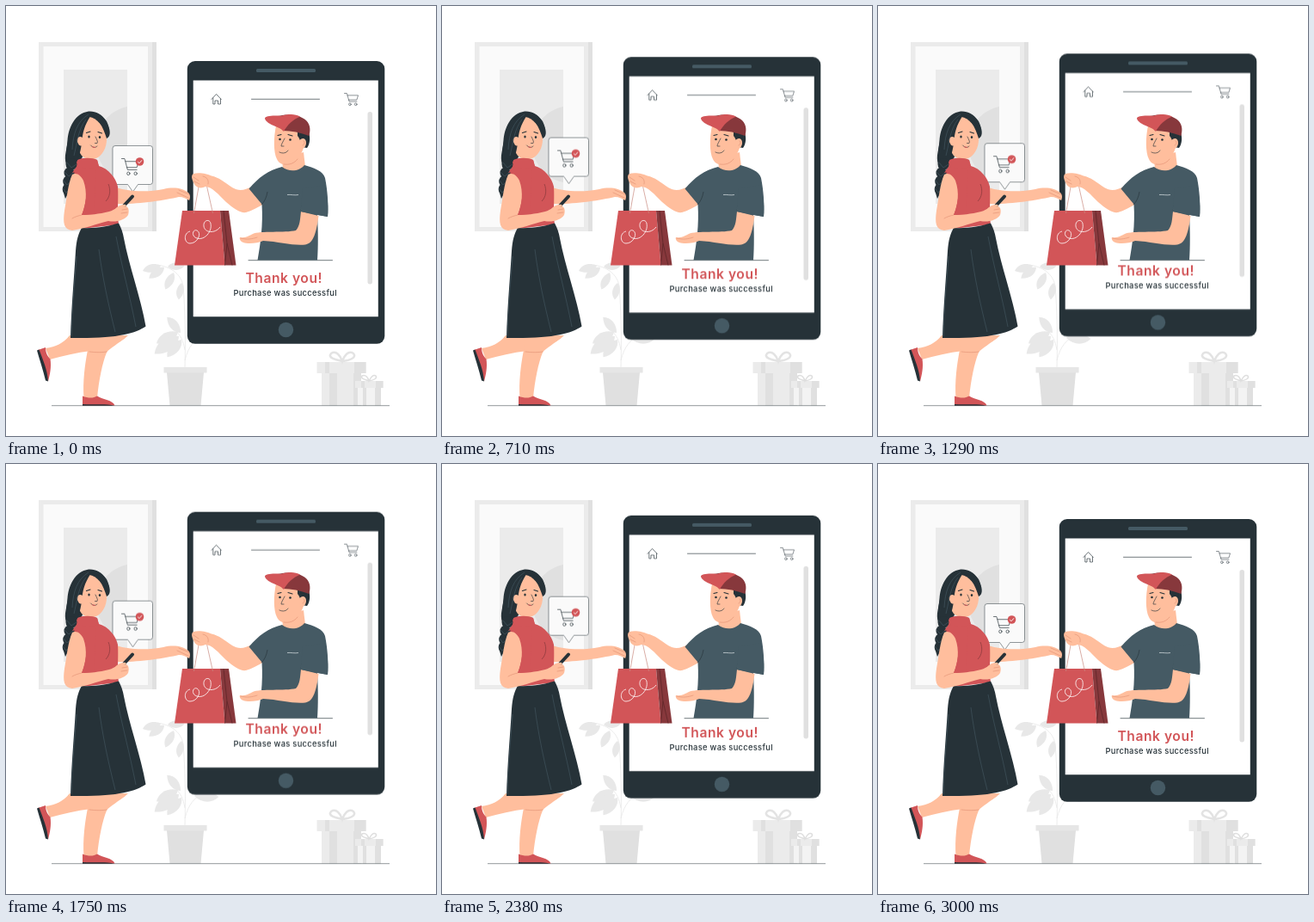
An HTML page that plays this animation: 500 by 500 pixels, repeating every 3.04 s.

```html
<!DOCTYPE html>
<html lang="en">
<head>
<meta charset="utf-8">
<title>Purchase successful</title>
<style>
html, body { margin: 0; width: 100%; height: 100%; overflow: hidden; background: #fff; }
svg { display: block; width: 100vw; height: 100vh; }

/* 24 pictures a second: 3 s of movement, then one picture of rest */
.tablet, .bubble { animation: 3040ms -5ms infinite; }
.tablet { animation-name: drift; animation-timing-function: steps(36, end); }
.bubble { animation-name: bob; animation-timing-function: steps(18, end); }
@keyframes drift {
  0%, 98.684%, 100% { transform: translateY(0); }
  49.342% { transform: translateY(-10px); }
}
@keyframes bob {
  0%, 49.342%, 98.684%, 100% { transform: translateY(0); }
  24.671%, 74.013% { transform: translateY(-10px); }
}

.skin { fill: #ffbe9d; }
.red { fill: #d25558; }
.maroon { fill: #87383c; }
.dark { fill: #263238; }
.slate { fill: #455a64; }
.g1 { fill: #e0e0e0; }
.g2 { fill: #ebebeb; }
.g3 { fill: #f3f3f3; }
.line { fill: none; stroke: #263238; stroke-width: .65; stroke-linecap: round; stroke-linejoin: round; }
.brow { fill: none; stroke: #263238; stroke-width: 1.1; stroke-linecap: round; }
.crease { fill: none; stroke: #e08f72; stroke-width: .6; stroke-linecap: round; }
.fold { fill: none; stroke: #455a64; stroke-width: .6; }
text { font-family: Inter, "Open Sans", sans-serif; text-anchor: middle; }
.title { font-size: 15.6px; font-weight: 600; letter-spacing: .035em; }
.note { font-size: 9.4px; font-weight: 450; letter-spacing: .03em; }
</style>
</head>
<body>
<svg viewBox="0 0 500 500">
  <defs>
    <clipPath id="art"><path d="M67 74H141V230H67Z"/></clipPath>
    <path id="leaf" d="M0 0C3-7 12-10 21-6C17 2 8 4 0 0Z"/>
    <g id="cart" class="line">
      <path d="M0 0H3.5L7 12H18M4.500 3H20L18 9.500H6.200"/>
      <circle cx="8" cy="16" r="1.700"/><circle cx="16.500" cy="16" r="1.700"/>
    </g>
  </defs>

  <g id="picture">
    <path class="g2" d="M38 42H170V262H38Z"/>
    <path class="g1" d="M170 42H175V262H170Z"/>
    <path fill="#fafafa" d="M43.500 47H165V257H43.500Z"/>
    <path class="g2" d="M67 74H141V230H67Z"/>
    <circle class="g1" cx="150" cy="161" r="45" clip-path="url(#art)"/>
  </g>

  <g id="plant">
    <path d="M208 420C209 385 208 350 206 325C203 310 190 303 176 301M208 400C206 388 203 384 198 378M208 412C212 396 219 388 228 384" fill="none" stroke="#e8e8e8" stroke-width=".8"/>
    <g fill="#e8e8e8">
      <use href="#leaf" transform="translate(180 302) rotate(180)"/>
      <use href="#leaf" transform="translate(184 304) rotate(160)"/>
      <use href="#leaf" transform="translate(195 310) rotate(132)"/>
      <use href="#leaf" transform="translate(188 303) rotate(14) scale(.9)"/>
      <use href="#leaf" transform="translate(204 322) rotate(115) scale(.9)"/>
      <use href="#leaf" transform="translate(200 379) rotate(168) scale(1.300)"/>
      <use href="#leaf" transform="translate(201 384) rotate(160) scale(1.600)"/>
      <use href="#leaf" transform="translate(204 388) rotate(145) scale(1.200)"/>
      <use href="#leaf" transform="translate(203 380) rotate(245) scale(1.100)"/>
      <use href="#leaf" transform="translate(219 386) rotate(18) scale(1.300)"/>
    </g>
    <path class="g1" d="M187 426H230L226.500 464.500H190.500Z"/>
    <path fill="#e6e6e6" d="M183.500 420H233.500V426.500H183.500Z"/>
  </g>

  <g id="gifts">
    <path class="g2" d="M367 426H413V464.500H367Z"/>
    <path class="g1" d="M376 426H385V464.500H376ZM404 426H413V464.500H404Z"/>
    <path class="g2" d="M361.500 414H418.500V427H361.500Z"/>
    <path class="g1" d="M371 414H376V427H371ZM405 414H418.500V427H405Z"/>
    <path d="M391 413C382 411 374 409 378 404C384 400 389 407 391 413C393 407 398 400 404 404C408 409 400 412 391 413" fill="none" stroke="#e3e3e3" stroke-width="2.500"/>
    <path class="g3" d="M409 443H436V464.500H409Z"/>
    <path class="g1" d="M415 443H419V464.500H415ZM429 443H436V464.500H429Z"/>
    <path class="g2" d="M406 436H438.500V444H406Z"/>
    <path class="g1" d="M413 436H417V444H413ZM430 436H438.500V444H430Z"/>
    <path d="M422 436C416 434 412 433 414 430C418 428 421 432 422 436C424 432 427 428 430 430C432 433 428 435 422 436" fill="none" stroke="#dedede" stroke-width="1.500"/>
  </g>

  <path d="M53 464.700H446" stroke="#263238" stroke-width=".5"/>

  <g class="tablet">
    <rect class="dark" x="210.800" y="64.100" width="229.500" height="328.700" rx="9"/>
    <path fill="#fff" d="M217.700 86.500H432.800V361.300H217.700Z"/>
    <rect class="slate" x="291" y="72.900" width="69" height="4" rx="1.500"/>
    <circle class="slate" cx="325.500" cy="376.500" r="8.700"/>
    <rect class="g1" x="420.500" y="123" width="5.500" height="200.500" rx="2.700"/>
    <path class="line" d="M285.500 108.300H364.500"/>
    <path class="line" d="M239 108.500L244.500 102.500L250.200 108.500M240.800 107V114H243V110H246.500V114H249.500V108"/>
    <use href="#cart" transform="translate(393.500 101.500) scale(.8)"/>
    <text class="title red" x="323.300" y="322.300">Thank you!</text>
    <text class="note dark" x="324.700" y="336.500">Purchase was successful</text>
  </g>

  <path class="line" d="M282 295.700H379.500"/>

  <g id="bag">
    <path class="red" d="M205 238H249L254.500 301.500H196Z"/>
    <path class="maroon" d="M249 238H259L267.500 301.500H254.500Z"/>
    <path d="M253 238L257 276L254.500 301.500M257 276L263 301.500" fill="none" stroke="#5f2629" stroke-width=".8"/>
    <path d="M214 262C206 264 207 276 214 276C223 276 228 264 222 261C217 259 215 268 222 270C231 273 240 262 238 253C237 247 229 249 230 256C231 264 243 265 249 257" fill="none" stroke="#fff" stroke-width=".8"/>
    <path d="M218.500 241L225 205M240.500 241L232.500 205" fill="none" stroke="#c98a80" stroke-width=".7"/>
  </g>

  <g id="man">
    <path class="skin" d="M286 210C278 214 271 216 263 211C254 205 247 199 239 197.500C234 195 224 193 218 195C215 197 216 201 218 205C220 211 226 213 232 210C239 210 247 219 256 228C265 236 273 241 279 240C286 238 293 234 300 230Z"/>
    <path class="crease" d="M218 199L224 203M219 204L225 207M229 198C234 199 236 203 235 207"/>
    <path class="skin" d="M321 178L322 190C330 196 343 194 348 187L346 170Z"/>
    <path class="slate" d="M321 187C330 194 341 192 347 185C358 188 369 192 371 200C374 215 375 232 374 245L362 243C363 262 363 280 362 295.500H292.500C296 275 299 255 297.500 230.500L282.500 212.500C294 199 305 191 321 187Z"/>
    <path d="M297 231C301 227 303 222 304 216M343 238C345 228 347 220 350 214" fill="none" stroke="#263238" stroke-width=".6"/>
    <path d="M327 219.500C331 219 336 220.500 340 219.500" fill="none" stroke="#dfe6e9" stroke-width=".7"/>
    <path class="skin" d="M343 239L363.500 244C361 262 358 276 348 277.500C334 279 318 274 299 273C293 276 281 277 276 275C273 274 271 271 272 269C280 270 282 267 287 265C295 261 325 264 337 261C342 256 342 247 343 239Z"/>
    <path class="crease" d="M273 270C280 272 286 271 292 269"/>
    <path class="slate" d="M345 212L371 208C374 222 375 234 374 245L342.500 239Z"/>

    <path class="skin" d="M314 139C311 154 311 170 315 178C318 185 326 186 333 182C340 179 344 171 346 165L344 145Z"/>
    <path class="dark" d="M339 145L352.500 149C354 155 353 161 350 165L344 164C343 158 341 153 339 151Z"/>
    <path class="skin" d="M341 157C344 152 349 154 349 159C349 164 345 167 342 166Z"/>
    <path class="maroon" d="M316 128C326 125 342 126 349 133C355 139 353.500 146 352.500 151C342 147 332 145 322 145Z"/>
    <path class="red" d="M301 131C301 127.500 312 127 320 128C330 124.500 337 126 342 128.500C334 132 327 138 323 146C319 140 304 139 301 131Z"/>
    <path class="brow" d="M316 150.500L320 149.500M328 149.500L333 151"/>
    <path class="line" d="M324 154C322 158 320 161 320 163H323M318 170C322 172 326 171 328 168"/>
    <circle class="dark" cx="318.500" cy="155" r="1.300"/>
    <circle class="dark" cx="330.500" cy="155.500" r="1.300"/>
    <path class="crease" d="M323 184C330 185 335 183 339 178M346 157C348 158 347 161 345 162"/>
  </g>

  <g class="bubble">
    <path d="M127 162.500H167.500Q170.500 162.500 170.500 165.500V204.500Q170.500 207.500 167.500 207.500H153.500L147.500 216L141.500 207.500H127Q124 207.500 124 204.500V165.500Q124 162.500 127 162.500Z" fill="#fafafa" stroke="#263238" stroke-width=".5"/>
    <use href="#cart" transform="translate(134.500 177.500) scale(.98 1.080)"/>
    <circle class="red" cx="155.500" cy="181" r="4.800"/>
    <path d="M153.200 181L155 182.800L158 179.300" fill="none" stroke="#fff" stroke-width=".9"/>
  </g>

  <g id="woman">
    <path class="skin" d="M122 209C140 216 163 217 183 213C195 210 206 212 212 217C215 220 214 224 213 226C209 224 206 222 201 222C184 226 152 231 126 230Z"/>
    <path class="crease" d="M199 217L212 223M201 214L213 219"/>

    <path class="skin" d="M74 383H142C132 394 116 396 99 401C82 403 66 407 51 411L46 398C58 396 66 393 74 383Z"/>
    <path class="skin" d="M97 383H141C130 394 121 397 117 403C112 415 108 435 106 456H90.500C89 437 92 415 95 400Z"/>
    <path class="crease" d="M117 402C112 403 105 403 97 402"/>
    <path class="red" d="M37 400L46 397C46 404 49 408 51.500 410.500C53 420 51 429 49 436.500Z"/>
    <path class="dark" d="M36 400.500L38.500 399.500C43 412 48 422 49 436.500L46 435.500C43 423 39 411 36 400.500Z"/>
    <path class="red" d="M89 453.500C96 456.500 102 456 106 453.500C113 458 124 458 126.500 464.500H89Z"/>
    <path class="dark" d="M89 463C102 464 116 462 126.500 464.800H89Z"/>

    <path class="red" d="M82 179C90 176 100 177 106 179L108 186C119 189 128 200 130 210C131 225 129 240 131 254L88 259C89 240 84 218 77 202C76 196 77 191 82 188Z"/>
    <path d="M119 207C122 214 121 222 116 227M82 184C91 188 100 188 107 184" fill="none" stroke="#87383c" stroke-width=".7"/>

    <path class="dark" d="M88 258C104 259 119 256 131 252.500C134 258 136 264 137 270C143 302 157 340 162.500 372.500C150 381 128 387 75 386C76 350 79 318 81 285C82 272 84 265 88 258Z"/>
    <path class="fold" d="M82 291C80 318 77 350 76 384M108 283C112 315 119 347 127 379M128 268C134 300 144 337 151 373"/>

    <path class="dark" d="M117 154C123 151 121 143 117 134C111 125 104 122 96 122.500C80 125 72 142 71.500 158C71 167 67 174 70 184L83 186L92 170Z"/>
    <path class="skin" d="M97 129C105 130 114 140 117 150C118 162 114 171 107 176C101 180 93 179 88 174C83 168 81 153 85 146Z"/>
    <path class="red" d="M81 180C88 176 100 176 106 179L108 187C99 190 89 190 80 188Z"/>
    <path class="dark" d="M101 124C96 131 91 139 89 151C88 163 86 173 82 182L70 182C69 160 75 132 90 125ZM98 126C106 129 113 140 117 154C123 148 119 138 115 132C110 126 104 123 98 126Z"/>
    <path class="skin" d="M89 153C84 150 81 155 84 160C85 163 88 163 90 162Z"/>
    <path class="brow" d="M93.500 147.500L98 146M107 146.500L111.500 148"/>
    <path class="line" d="M104 152C106 156 107 158 106 159.500H103.500M98.500 162C101 165 104 165 106 163"/>
    <ellipse class="dark" cx="96.500" cy="152" rx="1.200" ry="1.600"/>
    <ellipse class="dark" cx="109" cy="152.500" rx="1.200" ry="1.600"/>
    <path class="red" d="M99.500 163C101 165 103 165.500 104.500 164.500Z"/>
    <path class="fold" d="M96 126C83 134 78 148 77 167M93 132C84 143 83 158 79 174"/>

    <g class="dark">
      <ellipse cx="76" cy="184" rx="6.500" ry="7"/>
      <ellipse cx="73.500" cy="194" rx="6" ry="6.500"/>
      <ellipse cx="71.500" cy="204" rx="5.300" ry="6.500"/>
      <ellipse cx="70" cy="213" rx="4.300" ry="6"/>
      <path d="M66 214L74 215L69 224Z"/>
    </g>
    <path class="fold" d="M71 182L76 188L82 184M68 193L73 198L79 193M67 203L71 208L77 203M66 212L70 217L74 213"/>

    <path class="skin" d="M77 196C72 207 71 222 68 238C66 252 67 260 77 261C91 259 106 253 119 250C128 252 138 249 142 243C144 237 142 232 137 232C131 232 127 237 120 239C108 242 97 243 88 243C93 231 95 217 90 203C87 197 82 193 77 196Z"/>
    <path class="red" d="M77 194C86 190 94 202 94 216C93 226 91 236 88 243L102 242L105 190L82 187Z"/>
    <path class="crease" d="M88 243C84 244 80 245 77 247M130 240C133 239 136 238 138 238M131 244C135 244 138 242 140 241"/>
    <path d="M137.300 232L147 221.500" stroke="#263238" stroke-width="4" stroke-linecap="round"/>
    <path class="skin" d="M126 237C130 232 136 230 139 231C141 232 138 234 136 236L142 236L140 245L128 246Z"/>
    <path class="crease" d="M135 237L141 236M134 241L141 240"/>
  </g>
</svg>
</body>
</html>
```
